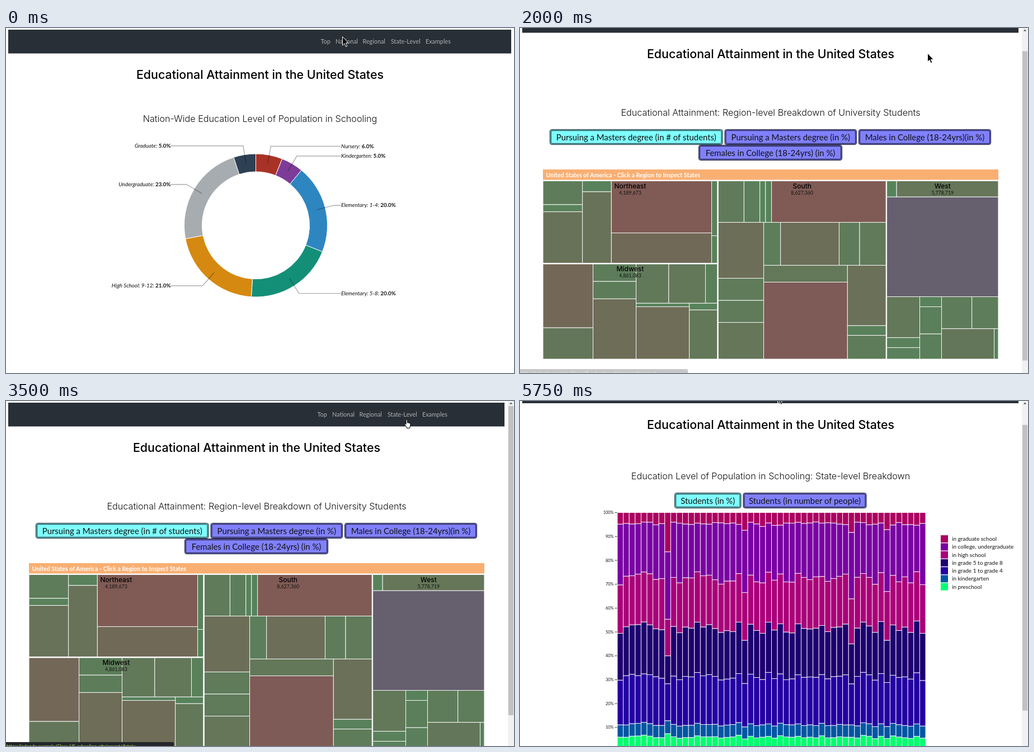
Write an HTML page that moves like this. It is 908 px wide and 617 px high and loops after 6 s.

```html
<!DOCTYPE html>
<html lang="en">
<head>
<meta charset="utf-8">
<title>Educational Attainment</title>
<style>
  html, body { margin: 0; width: 100%; height: 100%; overflow: hidden; background: #fff; }
  svg { display: block; width: 908px; height: 617px; }
  text { font-family: Lato, "Open Sans", sans-serif; fill: #111; white-space: pre; }
  .title, .sub, .region { font-family: Inter, "Open Sans", sans-serif; font-optical-sizing: none; text-anchor: middle; }
  .title { font-size: 21.4px; font-weight: 500; fill: #000; }
  .sub { font-size: 16.2px; font-weight: 300; }
  .region { font-size: 12px; font-weight: 500; fill: #000; }
  .count { font-size: 8.8px; text-anchor: middle; }
  .nav { font-size: 10.8px; fill: #adb1b4; }
  .slice { font-size: 9.8px; font-style: italic; }
  .slice tspan { font-style: normal; font-weight: 700; }
  .btn { font-size: 14.9px; text-anchor: middle; }
  .hint { font-size: 10.7px; font-weight: 700; fill: #fff; }
  .tick { font-size: 7.4px; text-anchor: end; }
  .state { font-size: 7.3px; fill: #333; }
  .key { font-size: 10px; }
  .link { font-size: 8.4px; fill: #b5e853; }
</style>
</head>
<body>
<svg id="stage" viewBox="0 0 908 617"></svg>
<script>
const stage = document.getElementById('stage');

function el(parent, tag, attrs, text) {
  const node = document.createElementNS('http://www.w3.org/2000/svg', tag);
  for (const k in attrs) node.setAttribute(k, attrs[k]);
  if (text) node.textContent = text;
  parent.append(node);
  return node;
}
const rect = (g, x, y, width, height, fill, more) =>
  el(g, 'rect', { x, y, width, height, fill, ...more });
const label = (g, cls, x, y, text, more) =>
  el(g, 'text', { class: cls, x, y, ...more }, text);
const total = list => list.reduce((a, b) => a + b, 0);

function makePage(mid, subtitle, subY) {
  const g = el(stage, 'g', {}), dx = mid - 448;
  rect(g, 4, 3, 887 + dx * 2, 42.5, '#282f36');
  const nav = { Top: 556.5, National: 583, Regional: 631.5, 'State-Level': 682, Examples: 744 };
  for (const name in nav) label(g, 'nav', nav[name] + dx, 28, name);
  label(g, 'title', mid, 91, 'Educational Attainment in the United States');
  label(g, 'sub', mid, subY, subtitle);
  return g;
}

function button(g, x, y, w, text, fill) {
  const line = { stroke: '#14141e', 'stroke-width': 1 };
  rect(g, x + .5, y + .5, w - 1, 27, fill, { rx: 3.5, ...line });
  rect(g, x + 2.5, y + 2.5, w - 5, 23, fill, { rx: 1.5, ...line });
  label(g, 'btn', x + w / 2, y + 19.5, text);
}
const CYAN = '#7fffff', BLUE = '#8080ff';

// National: donut
function drawNational() {
  const g = makePage(454, 'Nation-Wide Education Level of Population in Schooling', 168);
  const cx = 446.5, cy = 353;
  const at = (share, r) => {
    const a = share / 50 * Math.PI;
    return [cx + r * Math.sin(a), cy - r * Math.cos(a)];
  };
  const slices = [
    ['Nursery', 6, '#a93226'], ['Kindergarten', 5, '#7d3c98'],
    ['Elementary: 1-4', 20, '#2e86c1'], ['Elementary: 5-8', 20, '#148f77'],
    ['High School: 9-12', 21, '#d68910'], ['Undergraduate', 23, '#a6acaf'],
    ['Graduate', 5, '#2e4053']
  ];
  let from = 0;
  for (const [name, share, fill] of slices) {
    const to = from + share, mid = from + share / 2;
    el(g, 'path', {
      d: `M${at(from, 128)}A128 128 0 0 1 ${at(to, 128)}L${at(to, 96)}A96 96 0 0 0 ${at(from, 96)}Z`,
      fill, stroke: '#fff', 'stroke-width': 1
    });
    const bend = at(mid, 144), right = mid < 50;
    const x = cx + (right ? 152 : -152);
    el(g, 'polyline', {
      points: [at(mid, 112), bend, [x, bend[1]]].join(' '),
      fill: 'none', stroke: '#000', 'stroke-width': 1.4, opacity: .32
    });
    const t = label(g, 'slice', x + (right ? .5 : 0), bend[1] + 3.3, name + ': ',
      { 'text-anchor': right ? 'start' : 'end' });
    el(t, 'tspan', {}, share + '.0%');
    from = to;
  }
  return g;
}

// Regional: squarified treemap, students per state in region order
const regions = [
  ['Northeast', '4,189,673', [30, 9, 65, 10, 66, 167, 97, 10, 5]],
  ['Midwest', '4,861,083', [102, 50, 24, 24, 83, 41, 46, 15, 6, 89, 6, 44]],
  ['South', '8,627,360',
    [34, 21, 7.4, 8, 151, 81, 32, 32, 53, 23, 80, 28, 36, 45, 205, 74, 12, 29]],
  ['West', '5,778,719', [5, 52, 355, 43, 10.5, 12, 7, 19, 17.5, 31, 27, 51, 4]]
];

function squarify(values, [x0, y0, x1, y1]) {
  const boxes = [];
  let rest = total(values);
  while (boxes.length < values.length) {
    const first = boxes.length, dx = x1 - x0, dy = y1 - y0, stacked = dx >= dy;
    const scale = 1.618 * rest * Math.min(dx / dy, dy / dx);
    let row = [], worst = Infinity;
    for (let end = first + 1; end <= values.length; end++) {
      const next = values.slice(first, end), beta = total(next) ** 2 / scale;
      const ratio = Math.max(Math.max(...next) / beta, beta / Math.min(...next));
      if (ratio > worst) break;
      row = next;
      worst = ratio;
    }
    const sum = total(row), part = sum / rest;
    let x = x0, y = y0;
    for (const v of row) {
      const w = dx * (stacked ? part : v / sum), h = dy * (stacked ? v / sum : part);
      boxes.push([x, y, x + w, y + h]);
      if (stacked) y += h; else x += w;
    }
    if (stacked) x0 += dx * part; else y0 += dy * part;
    rest -= sum;
  }
  return boxes;
}

// Green to red, then to purple for the largest
function shade(v) {
  const low = [86, 132, 91], mid = [128, 91, 85], high = [102, 95, 110];
  const [a, b, k] = v < 150 ? [low, mid, v / 150] : [mid, high, ((v - 150) / 205) ** 2];
  return `rgb(${a.map((c, i) => Math.round(c + (b[i] - c) * k))})`;
}

function drawRegional() {
  const g = makePage(448, 'Educational Attainment: Region-level Breakdown of University Students', 194);
  button(g, 53, 218, 309.5, 'Pursuing a Masters degree (in # of students)', CYAN);
  button(g, 365.5, 218, 236.5, 'Pursuing a Masters degree (in %)', BLUE);
  button(g, 605, 218, 237, 'Males in College (18-24yrs)(in %)', BLUE);
  button(g, 319, 246, 257, 'Females in College (18-24yrs) (in %)', BLUE);
  rect(g, 41, 290, 814, 18.5, '#f9af72');
  label(g, 'hint', 46.5, 303.5, 'United States of America - Click a Region to Inspect States');
  const boxes = squarify(regions.map(r => total(r[2])), [40.3, 309.8, 855.7, 629.8]);
  regions.forEach(([name, count, values], i) => {
    const gap = .75, [x0, y0, x1, y1] = boxes[i];
    squarify(values, [x0 + gap, y0 + gap, x1 - gap, y1 - gap]).forEach(([l, t, r, b], k) =>
      rect(g, l, t, r - l, b - t, shade(values[k]), { stroke: '#fff', 'stroke-width': .9 }));
    label(g, 'region', (x0 + x1) / 2, y0 + 13.7, name);
    label(g, 'count', (x0 + x1) / 2, y0 + 24.7, count);
  });
  return g;
}

// State level: stacked bars
const states = ('Alabama,Alaska,Arizona,Arkansas,California,Colorado,Connecticut,Delaware,' +
  'District of Columbia,Florida,Georgia,Hawaii,Idaho,Illinois,Indiana,Iowa,Kansas,Kentucky,' +
  'Louisiana,Maine,Maryland,Massachusetts,Michigan,Minnesota,Mississippi,Missouri,Montana,' +
  'Nebraska,Nevada,New Hampshire,New Jersey,New Mexico,New York,North Carolina,North Dakota,' +
  'Ohio,Oklahoma,Oregon,Pennsylvania,Rhode Island,South Carolina,South Dakota,Tennessee,Texas,' +
  'Utah,Vermont,Virginia,Washington,West Virginia,Wisconsin,Wyoming,Puerto Rico').split(',');
const keys = [
  ['in preschool', '#00ff70'], ['in kindergarten', '#0056a3'], ['in grade 1 to grade 4', '#2400a3'],
  ['in grade 5 to grade 8', '#1d0070'], ['in high school', '#aa007a'],
  ['in college, undergraduate', '#7a00a3'], ['in graduate school', '#ab0061']
];
// States with far fewer young pupils
const dips = { 'District of Columbia': 12, Massachusetts: 5.5, 'Rhode Island': 7, Vermont: 5.5 };

let seed = 7;
function wiggle(size) {
  seed = seed * 16807 % 2147483647;
  return (seed / 2147483647 * 2 - 1) * size;
}

// Every boundary follows from the share up to grade 8.
function levels(name) {
  const diff = name in dips ? -dips[name] : wiggle(2.6);
  const skew = Math.min(0, diff) ** 2;
  const kinder = 11.2 + .28 * diff + .033 * skew + wiggle(.5);
  const early = 31.4 + .62 * diff + .028 * skew + wiggle(.4);
  const high = 72.9 + diff - .035 * skew + wiggle(.6);
  const college = 95.4 - .08 * skew + wiggle(.7);
  return [0, kinder * .85 - 3.5, kinder, early, 52 + diff, high, college, 100];
}

function drawStates() {
  const g = makePage(448, 'Education Level of Population in Schooling: State-level Breakdown', 181);
  button(g, 276, 205.5, 119.5, 'Students (in %)', CYAN);
  button(g, 398.5, 205.5, 221, 'Students (in number of people)', BLUE);
  const step = 551 / states.length, yOf = p => 668 - p * 4.27;
  for (let p = 0; p <= 100; p += 10) {
    rect(g, 169.5, yOf(p) - .4, 4.5, .9, '#222');
    label(g, 'tick', 167.5, yOf(p) + 2.6, p + '%');
  }
  states.forEach((name, i) => {
    const x = 174 + i * step, mid = x + step / 2, edge = levels(name);
    keys.forEach(([, fill], k) => {
      const top = yOf(edge[k + 1]);
      rect(g, x, top, step, yOf(edge[k]) - top, fill, { stroke: '#fff', 'stroke-width': .9 });
    });
    rect(g, mid - .4, 668, .8, 4, '#444');
    label(g, 'state', 0, 0, name, { transform: `translate(${mid - 3} 674.5) rotate(65)` });
  });
  keys.forEach(([name, fill], k) => {
    const y = 281.6 + (6 - k) * 14.25;
    rect(g, 752, y, 13, 13, fill);
    label(g, 'key', 772, y + 10, name);
  });
  return g;
}

const pages = { national: drawNational(), regional: drawRegional(), state: drawStates() };

// Browser parts
const bar = el(stage, 'g', {});
rect(bar, 897, 0, 11, 617, '#f1f1f1');
el(bar, 'path', { d: 'M899.8 5.5L902.5 2.5L905.2 5.5Z', fill: '#505050' });
const thumb = rect(bar, 898, 9, 9, 553, '#c1c1c1');
const thumbSize = { regional: 553, state: 511 };

const status = el(stage, 'g', {});
el(status, 'path', { d: 'M0 610H297Q300 610 300 613V617H0Z', fill: '#23262a' });
const link = label(status, 'link', 1, 620, ' ');

const arrow = el(stage, 'path', {
  d: 'M.5 .5V16L4 12.7L6.4 18.3L8.9 17.2L6.5 11.7H11Z',
  fill: '#000', stroke: '#fff', 'stroke-width': 1
});
const hand = el(stage, 'path', {
  d: 'M3 1.6a1.2 1.2 0 0 1 2.4 0V6l1.5-.2 1.6.5 1.5.5 .8 1V11l-1 2.6V15.6H4.2V14L.8 9.6Q0 8 1.3 7.6L3 9Z',
  fill: '#fff', stroke: '#000', 'stroke-width': 1
});

// Tracks hold each value from its start time on.
const pageTrack = [[0, 'national'], [1250, 'regional'], [4000, 'state']];
const scrollTrack = [
  [0, 0], [2000, 37], [2500, 57], [3000, 35.5], [3250, 0], [4000, 104], [4500, 112.5], [5000, 41.5]
];
const pointerTrack = [
  [0, 601, 15], [250, 632, 18], [500, 651, 33], [2000, 728, 44.5], [2500, 719, 38],
  [3000, 709, 29.5], [3250, 712, 33], [4250, 707, 62], [4500, 706, 82.5],
  [5000, 671, 77], [5250, 478, 1], [5500, 460, -12]
];
const hovers = [[500, 2000, 'regional'], [3250, 4250, 'state']];
const held = (track, t) => track.findLast(k => k[0] <= t);

const show = (node, on) => node.setAttribute('visibility', on ? 'visible' : 'hidden');

function draw(t) {
  const page = held(pageTrack, t)[1], scroll = held(scrollTrack, t)[1];
  for (const name in pages) show(pages[name], name === page);
  pages[page].setAttribute('transform', `translate(0 ${-scroll})`);

  const size = thumbSize[page];
  show(bar, size);
  if (size) {
    thumb.setAttribute('height', size);
    thumb.setAttribute('y', 9 + scroll * size / 628);
  }

  // The link bar appears 250 ms after hovering starts and fades when it ends.
  const [from, to, target] = hovers.find(h => t < h[1] + 250) || hovers[0];
  const hovering = t >= from && t < to;
  show(status, t >= from + 250 && t < to + 250);
  status.setAttribute('opacity', hovering ? 1 : .25);
  link.textContent = `https://orlenda.example/Class-US-schooling-attainment/#${target}`;

  const [, x, y] = held(pointerTrack, t);
  show(arrow, !hovering);
  show(hand, hovering);
  for (const p of [arrow, hand]) p.setAttribute('transform', `translate(${x} ${y})`);
}

const start = performance.now();
function tick() {
  draw((performance.now() - start) % 6000);
  requestAnimationFrame(tick);
}
tick();
</script>
</body>
</html>
```
